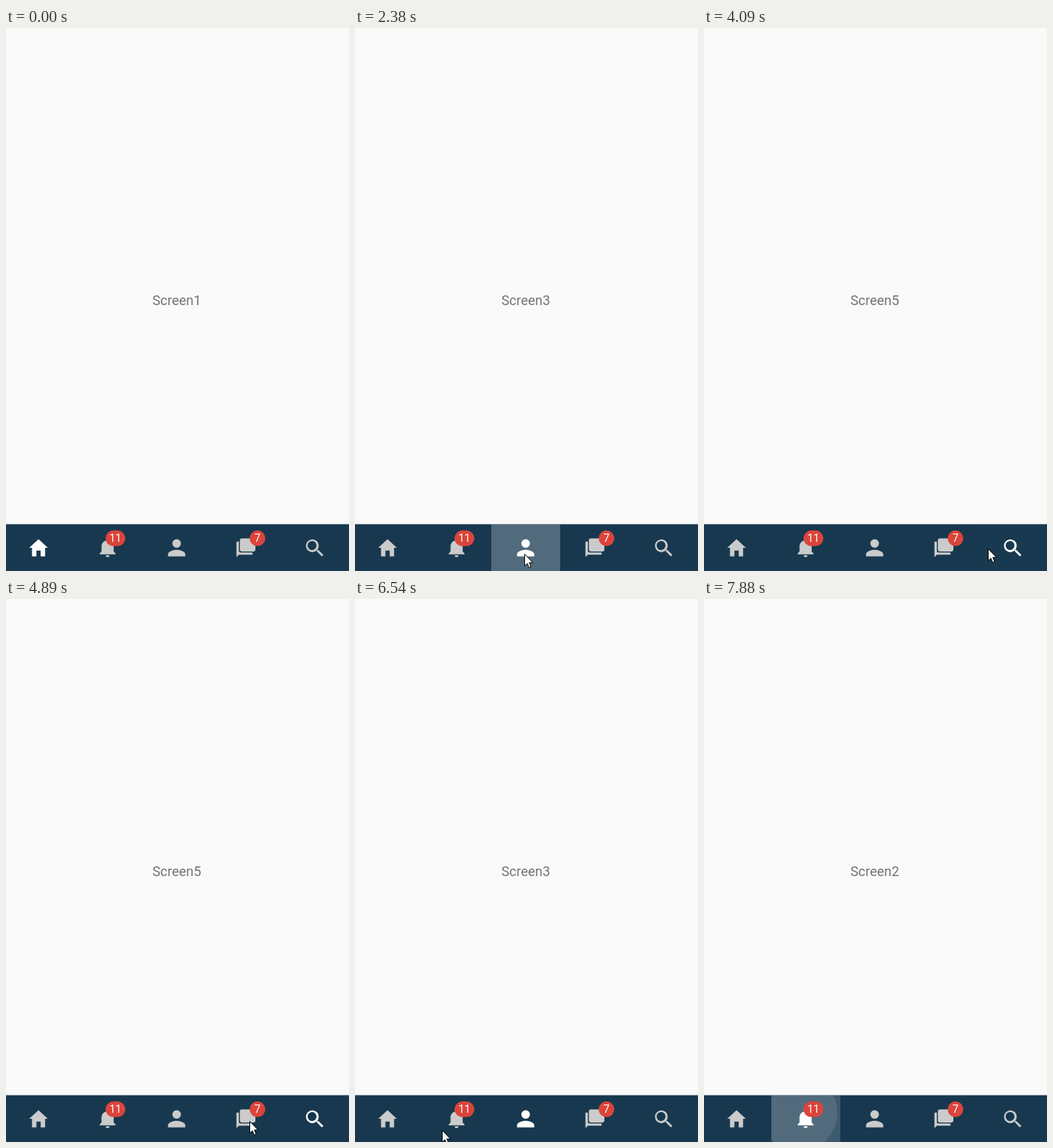
These frames come from a looping animation (458 by 725 pixels, 8070 ms). An HTML page with a canvas:

```html
<!DOCTYPE html>
<html lang="en">
<head>
<meta charset="utf-8">
<title>Bottom tabs</title>
<style>
html, body { margin: 0; height: 100%; overflow: hidden; background: #fafafa; }
canvas { display: block; }
</style>
</head>
<body>
<canvas id="stage" width="458" height="725"></canvas>
<script>
const ctx = document.getElementById('stage').getContext('2d');
const LOOP = 8070, LAST_MOVE = 7880, BAR_Y = 662.5, TAB_W = 92;

// Icons on a 512 grid, one per tab
const icons = [
  'M208 448V320h96v128h98V256h62L256 64 48 256h62v192z',
  'M256 464a41 41 0 0 0 41-42h-82a41 41 0 0 0 41 42zM391 339V225c0-63-45-118-104-131V79a31 31 0 0 0-62 0v15c-59 13-104 68-104 131v114l-41 42v21h352v-21z',
  'M256 256a96 96 0 0 0 0-192 96 96 0 0 0 0 192zm0 48c-64 0-192 32-192 96v48h384v-48c0-64-128-96-192-96z',
  'M166 48H432a40 40 0 0 1 40 40V300a40 40 0 0 1-40 40H166a40 40 0 0 1-40-40V88a40 40 0 0 1 40-40zM50 118H104V326a36 36 0 0 0 36 36H408V412H104L50 466z',
  'M338 305H320l-7-5a142 142 0 1 0-14 15l7 6v17L415 448l33-33zM206 305a99 99 0 1 1 0-197 99 99 0 0 1 0 197z'
].map(d => new Path2D(d));
const arrow = new Path2D('M.5.5V16.2L4 12.9 6.4 18.5 9 17.4 6.6 11.9H11.5z');

// Each tap: when, which tab, how long its ripple lasts
const taps = [
  { at: 0, tab: 0, last: 0 },
  { at: 1410, tab: 1, last: 460 },
  { at: 2100, tab: 2, last: 890 },
  { at: 2990, tab: 3, last: 790 },
  { at: 4090, tab: 4, last: 510 },
  { at: 4900, tab: 3, last: 600 },
  { at: 5690, tab: 2, last: 660 },
  { at: 6850, tab: 0, last: 670 },
  { at: 7750, tab: 1, last: 600 }
];

// Each pointer move: when it leaves, when it arrives, and where
const moves = [
  { from: 720, to: 1100, x: 138, y: 690 },
  { from: 1430, to: 1600, x: 226, y: 702 },
  { from: 2400, to: 2750, x: 325, y: 699 },
  { from: 3150, to: 3450, x: 379, y: 695 },
  { from: 4750, to: 4880, x: 325, y: 697 },
  { from: 5330, to: 5700, x: 122, y: 695 },
  { from: 6030, to: 6250, x: 327, y: 711 },
  { from: 6250, to: 6690, x: 40, y: 708 },
  { from: 7400, to: 7520, x: 228, y: 725 }
];

const clamp = v => Math.max(0, Math.min(1, v));
const ease = v => v * v * (3 - 2 * v);

function drawRipple({ at, tab, last }, t) {
  const age = t - at;
  if (age < 0 || age >= last) return;
  const left = tab * TAB_W - 2;
  const fade = clamp((1 - age / last) / 0.45) * clamp(age / 60);
  ctx.save();
  ctx.beginPath();
  ctx.rect(left, BAR_Y, TAB_W, 63);
  ctx.clip();
  ctx.fillStyle = '#fff';
  ctx.globalAlpha = 0.17 * fade;
  ctx.fillRect(left, BAR_Y, TAB_W, 63);
  ctx.globalAlpha = 0.1 * fade;
  ctx.beginPath();
  ctx.arc(left + 37, 686, 20 + age * 0.24, 0, 7);
  ctx.fill();
  ctx.restore();
}

function drawIcon(i, active) {
  ctx.save();
  ctx.translate(28.1 + i * 92.2, 678.6);
  ctx.scale(0.06, 0.06);
  ctx.fillStyle = active ? '#fff' : '#cbcbcb';
  ctx.fill(icons[i]);
  ctx.restore();
}

function label(text, x, y, size, color) {
  ctx.font = size + 'px Roboto, sans-serif';
  ctx.textAlign = 'center';
  ctx.fillStyle = color;
  ctx.fillText(text, x, y);
}

function drawBadge(text, x, w) {
  ctx.fillStyle = '#db443b';
  ctx.beginPath();
  ctx.roundRect(x - w / 2, 670.8, w, 21, 10.5);
  ctx.fill();
  label(text, x, 686.3, 14.5, '#fff');
}

function drawPointer(t) {
  if (t < moves[0].from || t >= moves.at(-1).to) return;
  let x = 191, y = 725;
  for (const m of moves) {
    const k = ease(clamp((t - m.from) / (m.to - m.from)));
    x += (m.x - x) * k;
    y += (m.y - y) * k;
  }
  ctx.save();
  ctx.translate(Math.round(x), Math.round(y));
  ctx.fillStyle = '#fff';
  ctx.strokeStyle = '#000';
  ctx.fill(arrow);
  ctx.stroke(arrow);
  ctx.restore();
}

function draw(now) {
  const t = Math.min(now % LOOP, LAST_MOVE);
  const active = taps.findLast(p => p.at <= t).tab;

  ctx.fillStyle = '#fafafa';
  ctx.fillRect(0, 0, 458, 725);
  label('Screen' + (active + 1), 228, 370, 18, '#757274');
  ctx.fillStyle = '#17384f';
  ctx.fillRect(0, BAR_Y, 458, 63);
  taps.forEach(p => drawRipple(p, t));
  icons.forEach((_, i) => drawIcon(i, i === active));
  drawBadge('11', 146.1, 26.6);
  drawBadge('7', 335.8, 21);
  drawPointer(t);
}

const begin = performance.now();
function tick() {
  draw(performance.now() - begin);
  requestAnimationFrame(tick);
}
tick();
</script>
</body>
</html>
```
